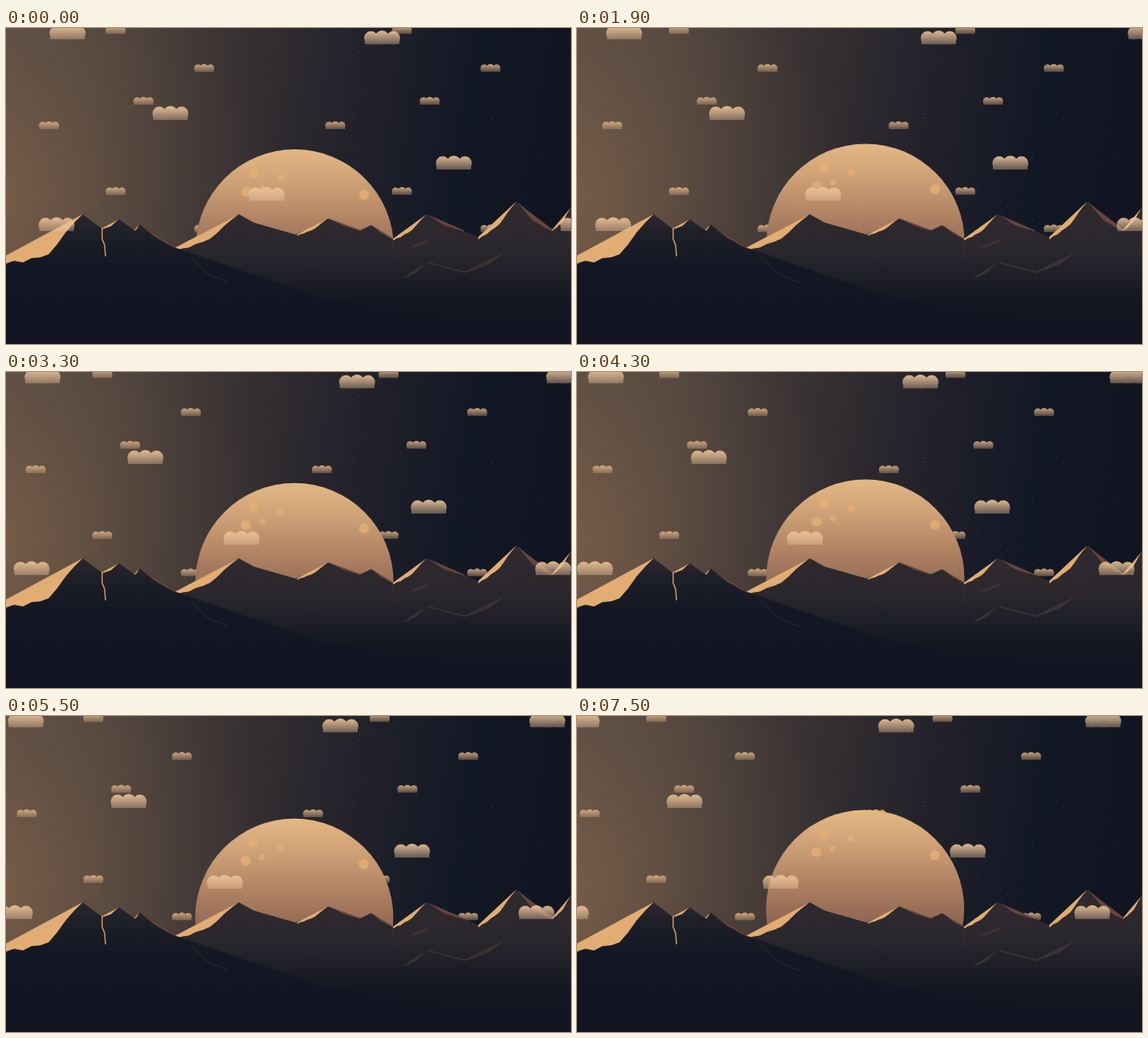
These frames come from a looping animation (670 px wide and 375 px high, 7600 ms). An HTML page with a canvas:

```html
<!DOCTYPE html>
<html lang="en">
<head>
<meta charset="utf-8">
<title>Moonrise</title>
<style>
html, body { margin: 0; width: 100%; height: 100%; overflow: hidden; background: #10141f; }
canvas { display: block; width: 670px; height: 375px; }
</style>
</head>
<body>
<canvas id="stage" width="670" height="375"></canvas>
<script>
const W = 670, H = 375, LOOP = 7600, STEP = 100;
const LIT = '#e2ad74', RED = '#68443c', FAINT = '#3c3233';
const ctx = document.getElementById('stage').getContext('2d');

function layer(paint) {
  const c = document.createElement('canvas');
  c.width = W;
  c.height = H;
  paint(c.getContext('2d'));
  return c;
}

// Spreads the colors evenly over a gradient
function spread(gradient, colors) {
  colors.forEach((c, i) => gradient.addColorStop(i / (colors.length - 1), c));
  return gradient;
}

const vertical = (g, y0, y1, ...colors) => spread(g.createLinearGradient(0, y0, 0, y1), colors);

function trace(g, points) {
  g.beginPath();
  for (const [x, y] of points) g.lineTo(x, y);
}

function poly(g, points, fill) {
  trace(g, points);
  g.closePath();
  g.fillStyle = fill;
  g.fill();
}

function line(g, points, color, width) {
  trace(g, points);
  g.strokeStyle = color;
  g.lineWidth = width;
  g.stroke();
}

function disc(g, x, y, r, fill) {
  g.beginPath();
  g.arc(x, y, r, 0, Math.PI * 2);
  g.fillStyle = fill;
  g.fill();
}

function random(seed) {
  return () => (seed = (seed * 16807) % 2147483647) / 2147483647;
}

const sky = layer(g => {
  g.fillStyle = spread(g.createLinearGradient(0, 0, 655, 98),
    ['#5a4c43', '#51453e', '#3f3736', '#2f2b2f', '#20202a', '#131825', '#101521']);
  g.fillRect(0, 0, W, H);
  g.fillStyle = spread(g.createRadialGradient(-30, 200, 10, -30, 200, 350),
    ['rgba(138,102,76,0.65)', 'rgba(118,94,72,0.3)', 'rgba(110,88,70,0)']);
  g.fillRect(0, 0, W, H);

  const rnd = random(4711);
  for (let i = 0; i < 130; i++) {
    const x = W * Math.pow(rnd(), 0.7), y = 245 * rnd();
    g.fillStyle = `rgba(205,185,165,${0.06 + 0.3 * Math.pow(rnd(), 3)})`;
    g.fillRect(Math.floor(x), Math.floor(y), 1, 1);
  }
});

// A sunlit side: the ridge from peak to foot above, a jagged edge below
function face(g, px, py, fx, fy, drop, fill) {
  const rnd = random(99), n = 9, points = [[px, py], [fx, fy]];
  for (let i = n; i > 0; i--) {
    const u = i / n;
    const depth = u < 0.45 ? u / 0.45 : 1.43 - 0.95 * u;
    points.push([px + (fx - px) * u, py + (fy - py) * u + drop * (depth + 0.24 * (rnd() - 0.5))]);
  }
  poly(g, points, fill);
}

const land = layer(g => {
  const back = [[195, 264], [276, 221], [294, 231], [343, 245], [364, 237], [382, 226], [420, 240],
    [433, 234], [459, 250], [499, 221], [560, 248], [605, 206], [648, 239], [W, 213]];
  poly(g, [...back, [W, H], [195, H]],
    vertical(g, 206, 350, '#2f2a2e', '#2d292e', '#2a272d', '#1f1f27', '#151822', '#111521'));

  face(g, 276, 221, 200, 261, 11, LIT);
  face(g, 382, 226, 345, 245, 4, LIT);
  face(g, 499, 221, 459, 250, 6, LIT);
  face(g, 605, 206, 560, 248, 8, LIT);
  face(g, W, 213, 648, 239, 5, LIT);
  face(g, 382, 226, 420, 240, 2, RED);
  face(g, 433, 234, 459, 250, 2, RED);
  face(g, 499, 221, 543, 240, 4, RED);
  face(g, 605, 206, 648, 239, 7, RED);

  face(g, 510, 247, 478, 260, 4, FAINT);
  face(g, 500, 277, 471, 296, 4, FAINT);
  face(g, 597, 263, 544, 289, 5, FAINT);
  line(g, [[500, 278], [544, 290]], FAINT, 1.5);
  line(g, [[351, 258], [364, 284]], FAINT, 0.7);
  line(g, [[458, 251], [461, 276]], FAINT, 0.7);

  const front = [[0, 281], [91, 221], [113, 238], [134, 227], [152, 240], [158, 233], [202, 261], [372, 320], [W, 367]];
  poly(g, [...front, [W, H], [0, H]],
    vertical(g, 221, H, '#2a262d', '#1b1d27', '#141824', '#121622', '#111521', '#131422'));

  face(g, 91, 221, 0, 270, 25, LIT);
  face(g, 134, 227, 113, 238, 3, LIT);
  face(g, 158, 233, 152, 240, 2, LIT);
  face(g, 158, 233, 202, 261, 3, RED);
  line(g, [[114, 238], [114, 250], [117, 258], [118, 271]], '#cf9d6b', 1.4);
  line(g, [[219, 272], [240, 292], [264, 302]], '#25242c', 1.5);
});

const SMALL = [[130, 7], [235, 52], [163, 91], [51, 120], [130, 198], [235, 242.5]];
const BIG = [[73, 13.5], [446, 19.5], [195, 109], [531, 168], [309, 205], [60, 241]];

// x is the middle, y the flat base
function cloud(x, y, scale, top, base) {
  ctx.save();
  ctx.translate(x, y);
  ctx.scale(scale, scale);
  ctx.beginPath();
  for (const side of [-1, 0, 1]) {
    const r = side ? 8.2 : 9;
    ctx.moveTo(13.2 * side + r, -7.5);
    ctx.arc(13.2 * side, -7.5, r, 0, Math.PI * 2);
  }
  ctx.rect(-20.5, -7, 41, 7);
  ctx.clip();
  ctx.fillStyle = vertical(ctx, -16.5, 0, top, base);
  ctx.fillRect(-22, -18, 44, 18);
  ctx.restore();
}

function drift(list, shift, period, scale, top, base) {
  for (const [x, y] of list)
    for (let k = 0; k < 2; k++) cloud(x + k * period - shift, y, scale, top, base);
}

// Offsets from the middle of the moon, then the radius
const CRATERS = [[-48.7, -89, 6], [-16.8, -83.5, 4], [-57.8, -67.5, 6], [-38.4, -71.5, 3.5], [82.4, -63.7, 6]];

function moon(t) {
  const r = 117.5, x = 342.4 - 0.1 * t, y = 261.5 - 3.2 * t - 0.15 * t * t;
  disc(ctx, x, y, r, vertical(ctx, y - r, y + 20, '#e4b884', '#cb9d74', '#ab7e61', '#8c6450'));
  for (const [dx, dy, size] of CRATERS) disc(ctx, x + dx, y + dy, size, 'rgba(226,174,116,0.85)');
}

function frame(now) {
  const t = Math.floor((now % LOOP) / STEP) * STEP / 1000;
  ctx.drawImage(sky, 0, 0);
  drift(SMALL, 4.8 * t, 339.5, 0.56, 'rgba(226,180,134,0.9)', 'rgba(205,165,128,0.34)');
  moon(t);
  ctx.drawImage(land, 0, 0);
  drift(BIG, 9 * t, 618.5, 1, 'rgba(236,194,148,0.95)', 'rgba(238,200,162,0.35)');
  requestAnimationFrame(frame);
}

requestAnimationFrame(frame);
</script>
</body>
</html>
```
